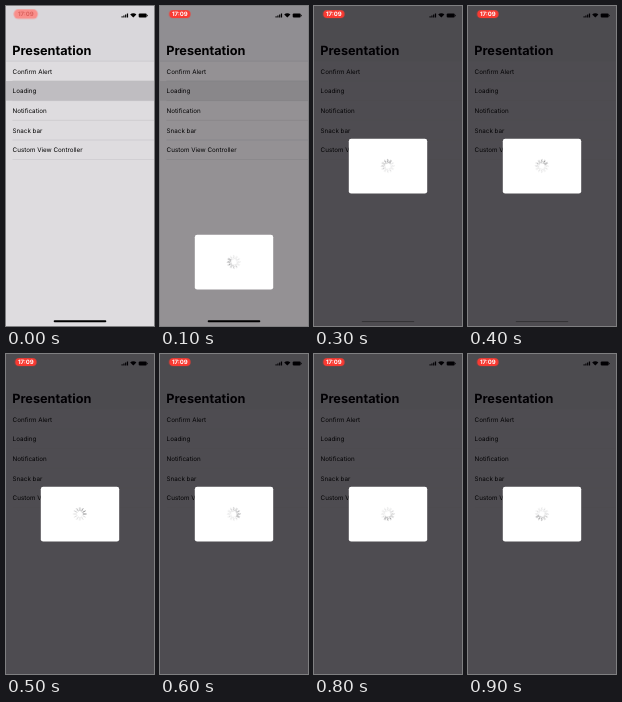
Write an HTML page that moves like this. It is 148 px wide and 320 px high and loops after 1000 ms.

```html
<!DOCTYPE html>
<html lang="en">
<head>
<meta charset="utf-8">
<style>
html, body { margin: 0; width: 100%; height: 100%; overflow: hidden; background: #dedcdf; }
svg { display: block; width: 148px; height: 320px; }
text { font-family: Inter, Roboto, sans-serif; fill: #000; text-rendering: geometricPrecision; }
.row { font-size: 6.28px; }
.title { font-size: 12.7px; font-weight: 700; }
.time { font-size: 6px; font-weight: 700; text-anchor: middle; }
.anim { animation: 1s step-end infinite; }
#pick { animation-name: pick; }
#lines { animation-name: lines; }
#home { animation-name: home; transform-box: fill-box; transform-origin: bottom; }
#dim { animation-name: dim; }
#card { animation-name: card; }
#spin { animation-name: spin; }
#pill { animation-name: pill; }
#clock { animation-name: clock; }
@keyframes pick { 0% { opacity: 1; } 10% { opacity: .5; } 20%, 100% { opacity: 0; } }
@keyframes lines { 0% { opacity: 1; } 20%, 100% { opacity: .2; } }
@keyframes home {
  0% { opacity: 1; transform: none; }
  20% { opacity: .5; transform: scaleY(.5); }
  50%, 100% { opacity: 0; transform: scaleY(.5); }
}
@keyframes dim { 0% { opacity: 0; } 10% { opacity: .34; } 20%, 100% { opacity: .65; } }
@keyframes card {
  0% { transform: translateY(192px); }
  10% { transform: translateY(96px); }
  20%, 100% { transform: none; }
}
@keyframes spin {
  0% { transform: rotate(-90deg); } 10% { transform: rotate(-60deg); }
  20% { transform: rotate(0deg); } 30% { transform: rotate(30deg); }
  40% { transform: rotate(60deg); } 50% { transform: rotate(90deg); }
  60% { transform: rotate(120deg); } 70% { transform: rotate(180deg); }
  80% { transform: rotate(210deg); } 90%, 100% { transform: rotate(240deg); }
}
@keyframes pill {
  0% { fill: #f98f8b; transform: scale(1.13, 1.16); }
  10%, 100% { fill: #f93a32; transform: none; }
}
@keyframes clock { 0% { fill: #d9605c; } 10%, 100% { fill: #fff; } }
</style>
</head>
<body>
<svg viewBox="0 0 148 320">
  <rect width="148" height="320" fill="#dedcdf"/>
  <rect width="148" height="55" fill="#d9d7db"/>
  <rect id="pick" class="anim" y="75" width="148" height="19.7" fill="#bfbdc1"/>
  <g id="lines" class="anim" stroke="#bebcc0" stroke-width=".5"></g>
  <text class="title" x="6.3" y="49.3">Presentation</text>
  <g id="rows"></g>
  <g id="status" transform="translate(.3 .4)">
    <path d="M115.2 11v-1.2h1.2V11zM117 11V9.2h1.2V11zM118.8 11V8.2h1.2V11zM120.6 11V7h1.2v4z"/>
    <path d="M127 11.2l-3.1-3.1a4.4 4.4 0 0 1 6.2 0z"/>
    <rect x="132.4" y="7.1" width="8" height="4" rx="1.1"/>
    <rect x="140.7" y="8.4" width=".7" height="1.4" rx=".3"/>
  </g>
  <rect id="home" class="anim" x="47.7" y="314.3" width="52.6" height="1.9" rx=".9"/>
  <rect id="dim" class="anim" width="148" height="320" fill="#030005"/>
  <g transform="translate(19.8 8.1)">
    <rect id="pill" class="anim" x="-10.7" y="-4.1" width="21.4" height="8.2" rx="4.1"/>
    <text id="clock" class="time anim" y="2.2">17:09</text>
  </g>
  <g id="card" class="anim">
    <rect x="34.8" y="132.8" width="78.4" height="54.8" rx="2.4" fill="#fff"/>
    <g transform="translate(73.8 160)"><g id="spin" class="anim"></g></g>
  </g>
</svg>
<script>
const ns = "http://www.w3.org/2000/svg";
const pitch = 19.7;

function add(parent, tag, attrs) {
  const el = document.createElementNS(ns, tag);
  for (const key in attrs) el.setAttribute(key, attrs[key]);
  return document.getElementById(parent).appendChild(el);
}

["Confirm Alert", "Loading", "Notification", "Snack bar", "Custom View Controller"]
  .forEach((label, i) => {
    add("rows", "text", { class: "row", x: 6.6, y: 67.6 + i * pitch }).textContent = label;
  });

for (let i = 0; i < 6; i++) {
  const y = 55.2 + i * pitch;
  add("lines", "line", { x1: i ? 6.5 : 0, x2: 148, y1: y, y2: y });
}

// Spokes fade counter-clockwise behind the leading one.
for (let i = 0; i < 12; i++) {
  add("spin", "line", {
    y1: -3.4, y2: -6.2, stroke: "#606064", "stroke-width": 0.75, "stroke-linecap": "round",
    opacity: Math.max(0.25, 1 - i * 0.12), transform: `rotate(${-30 * i})`
  });
}
</script>
</body>
</html>
```
